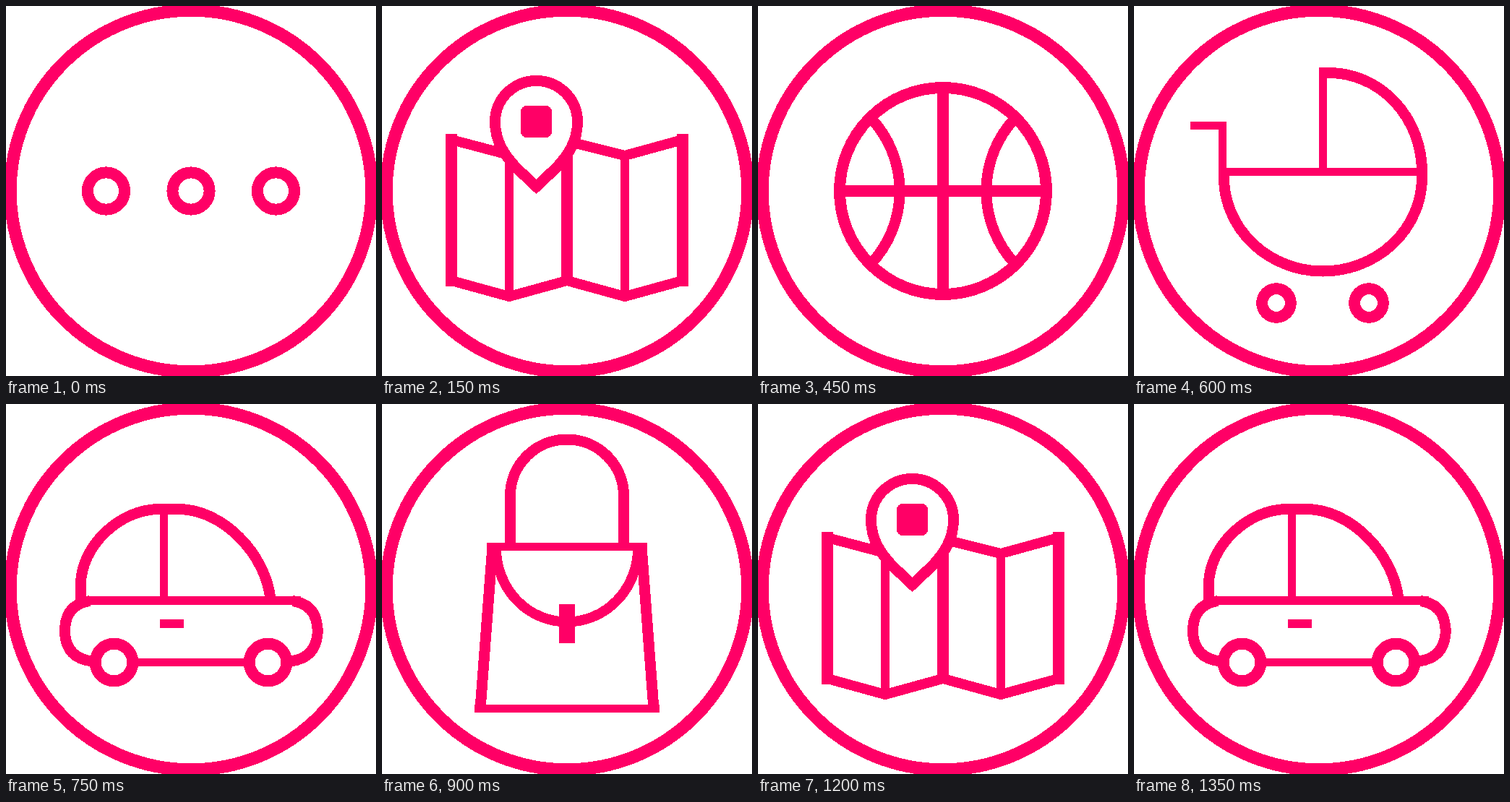
Animation of 512x512 px, one loop 1500 ms. Source, as an HTML page:

```html
<!DOCTYPE html>
<html lang="en">
<head>
<meta charset="utf-8">
<title>Icon loop</title>
<style>
  html, body { margin: 0; width: 100%; height: 100%; overflow: hidden; background: #fff; }
  svg { display: block; width: 100vw; height: 100vh; }
  .line { fill: none; stroke: #ff0066; stroke-width: 15; shape-rendering: crispEdges; }
  .thin { stroke-width: 11.5; }
  .fill { fill: #ff0066; stroke: none; }
  .icon { visibility: hidden; }
</style>
</head>
<body>
<svg viewBox="0 0 512 512">
  <g class="line">
    <!-- slightly larger than the stage, so its four extremes are cut flat -->
    <circle cx="256" cy="256" r="250" stroke-width="17.4"/>

    <g class="icon" id="dots" stroke-width="16">
      <circle cx="138.5" cy="256" r="25.6"/>
      <circle cx="256" cy="256" r="25.6"/>
      <circle cx="373.5" cy="256" r="25.6"/>
    </g>

    <g class="icon" id="bottle">
      <rect x="209" y="91" width="94" height="53" rx="23" stroke-width="13"/>
      <path class="thin" d="M205 112H190C168 112 156 128 154.5 150M240 144V187M272 144V187
        M166 272H346M166 378.5H346"/>
      <path d="M167 272V262A89 74.5 0 0 1 345 262V272" stroke-width="13.5"/>
      <path class="thin" d="M166 258V416Q166 442.5 192 442.5H320Q346 442.5 346 416V258"/>
    </g>

    <g class="icon" id="pram">
      <path class="thin" d="M78 165.5H122.5V238M122 229.5H398M261.5 85V229"/>
      <path d="M258 92.5H270A128.5 137 0 0 1 398.5 229.5V237A137 130 0 0 1 124.5 237V229"/>
      <circle cx="197" cy="411" r="19.8" stroke-width="16"/>
      <circle cx="325" cy="411" r="19.8" stroke-width="16"/>
    </g>

    <g class="icon" id="bag">
      <path d="M177.5 197V127A78.5 78 0 0 1 334.5 127V197"/>
      <path class="thin" d="M145 197.5H367M128 421.5H384"/>
      <path d="M153 197L136 422M359 197L376 422"/>
      <path d="M158 200A98 101.5 0 0 0 354 200" stroke-width="14"/>
      <path class="fill" d="M245 277H267V331H245Z"/>
    </g>

    <g class="icon" id="ball">
      <circle cx="256" cy="256" r="143" stroke-width="16"/>
      <path d="M256 110V400M110 256H400" stroke-width="16"/>
      <path d="M156 155A147 147 0 0 1 156 357M356 155A147 147 0 0 0 356 357"/>
    </g>

    <g class="icon" id="map">
      <path d="M96 177V388M256 203V380M416 177V388" stroke-width="16"/>
      <path class="thin" d="M176 207V403M336 207V403"/>
      <path d="M96 185L168 204M268 190L336 207L416 185M96 380L176 402L256 380L336 402L416 380" stroke-width="14"/>
      <path d="M213.5 250L186 224C170 207 156.5 188 156.5 160A57 56.5 0 0 1 270.5 160
        C270.5 188 257 207 241 224Z" fill="#fff"/>
      <rect class="fill" x="192" y="138" width="43" height="44" rx="8"/>
    </g>

    <g class="icon" id="car">
      <path d="M103.5 272V250C103.5 197 157 145.5 212 145.5H238C300 145.5 359 207 366 270"/>
      <path class="thin" d="M218.5 146V272M104 272H408M180 357.5H333"/>
      <path d="M122 356H118Q84 351 81.5 318V310Q84 277 116 272.5
        M390 356H394.5Q428.5 351 431 318V310Q428.5 277 396.5 272.5"/>
      <circle cx="149.5" cy="357.5" r="25.8" stroke-width="16"/>
      <circle cx="362.5" cy="357.5" r="25.8" stroke-width="16"/>
      <path class="fill" d="M213 298H246V310H213Z"/>
    </g>
  </g>
</svg>
<script>
  const STEP = 150;
  const order = ["dots", "map", "bottle", "ball", "pram", "car", "bag", "ball", "map", "car"];
  const icons = [...document.querySelectorAll(".icon")];
  const start = performance.now();

  function draw(now) {
    const t = Math.max(0, now - start);
    const current = order[Math.floor(t / STEP) % order.length];
    for (const icon of icons) {
      icon.style.visibility = icon.id === current ? "visible" : "hidden";
    }
    requestAnimationFrame(draw);
  }
  draw(start);
</script>
</body>
</html>
```
